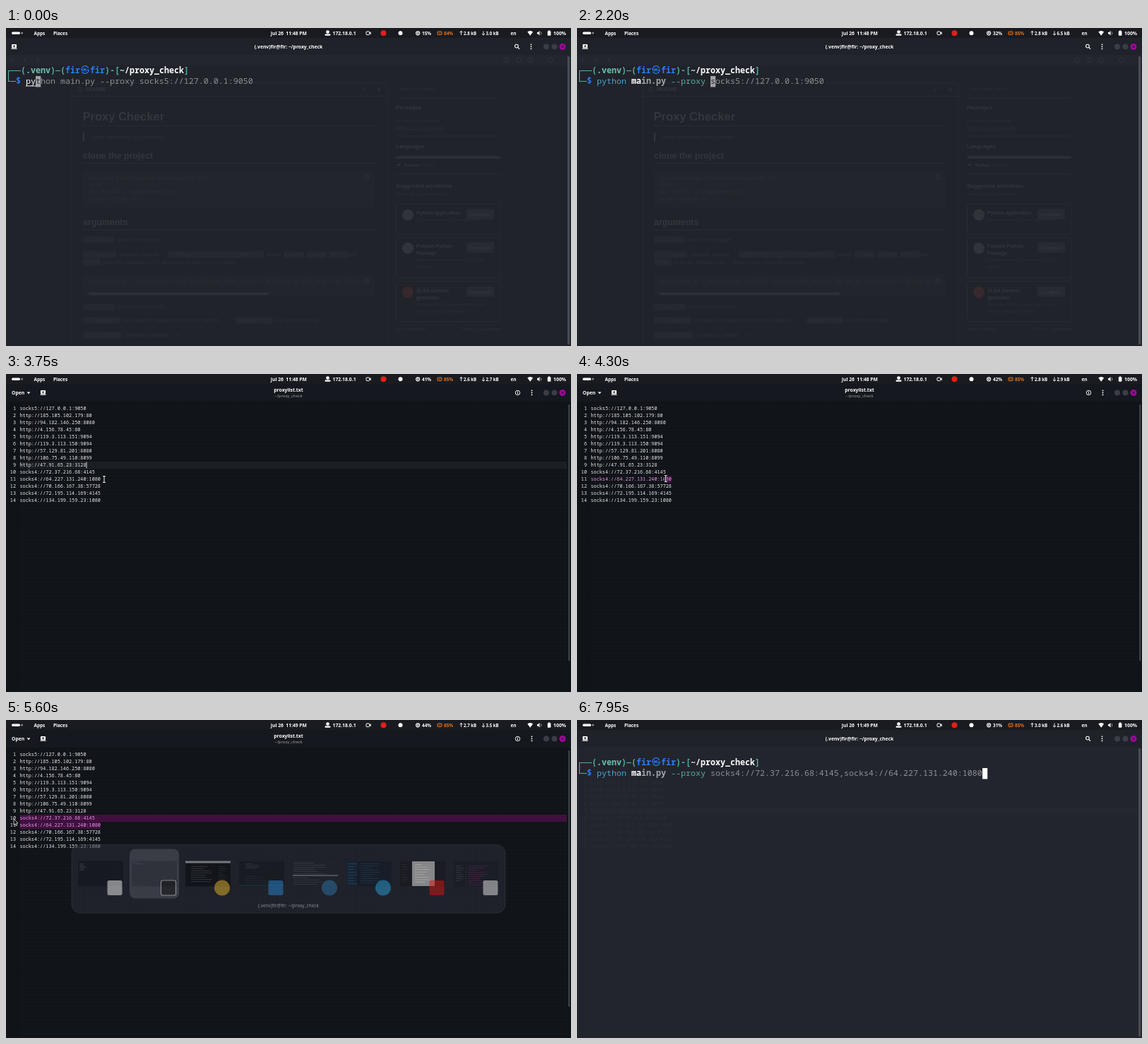
An HTML page with a canvas for the animation above (8 s loop, 800 by 450 pixels).

```html
<!DOCTYPE html>
<html lang="en">
<head>
<meta charset="utf-8">
<title>Proxy check</title>
<style>
html, body { margin: 0; width: 100%; height: 100%; overflow: hidden; background: #22252d; }
canvas { display: block; width: 800px; height: 450px; }
</style>
</head>
<body>
<canvas id="stage" width="800" height="450"></canvas>
<script>
const canvas = document.getElementById('stage');
const c = canvas.getContext('2d');
const LOOP = 8000, STEP = 50;
const SANS = '"Noto Sans", sans-serif';
const MONO = '"Noto Sans Mono", monospace';
const ARIAL = '"Liberation Sans", Arial, sans-serif';
const USER = 'fir';
const HOST_TITLE = `(.venv)${USER}@${USER}: ~/proxy_check`;
const TERM = '#22252d', GREY = '#8e9095', TEAL = '#53b09c', BLUE = '#277fff', WHITE = '#fff';

const clamp = v => Math.max(0, Math.min(1, v));
const ramp = (t, a, b) => clamp((t - a) / (b - a));
const ease = v => v * v * (3 - 2 * v);

function rect(x, y, w, h, color, r = 0) {
  c.fillStyle = color;
  c.beginPath();
  c.roundRect(x, y, w, h, r);
  c.fill();
}
function frame(x, y, w, h, color, r = 0, lw = 1) {
  c.strokeStyle = color;
  c.lineWidth = lw;
  c.beginPath();
  c.roundRect(x, y, w, h, r);
  c.stroke();
}
function dot(x, y, r, color) {
  c.fillStyle = color;
  c.beginPath();
  c.arc(x, y, r, 0, 7);
  c.fill();
}
function line(color, lw, ...p) {
  c.strokeStyle = color;
  c.lineWidth = lw;
  c.beginPath();
  c.moveTo(p[0], p[1]);
  for (let i = 2; i < p.length; i += 2) c.lineTo(p[i], p[i + 1]);
  c.stroke();
}
function poly(color, ...p) {
  c.fillStyle = color;
  c.beginPath();
  for (let i = 0; i < p.length; i += 2) c.lineTo(p[i], p[i + 1]);
  c.fill();
}
function text(s, x, y, color, font, align = 'left') {
  c.font = font;
  c.fillStyle = color;
  c.textAlign = align;
  c.fillText(s, x, y);
}
function fade(a, draw) {
  if (a <= 0) return;
  c.save();
  c.globalAlpha = a;
  draw();
  c.restore();
}

// ---- top bar ----
// time, cpu %, memory %, upload, download
const stats = [
  [0, 15, 84, '2.8', '3.0'], [550, 22, 84, '2.6', '2.9'], [950, 27, 84, '2.7', '2.8'],
  [1550, 30, 85, '2.9', '4.1'], [2000, 32, 85, '2.8', '6.5'], [2500, 34, 85, '2.6', '4.2'],
  [2950, 37, 85, '2.4', '2.6'], [3500, 41, 85, '2.6', '2.7'], [4000, 42, 85, '2.8', '2.9'],
  [4450, 40, 85, '2.5', '3.1'], [5000, 42, 85, '2.6', '3.2'], [5450, 44, 85, '2.7', '3.5'],
  [5950, 41, 85, '3.4', '2.8'], [6450, 36, 85, '4.8', '2.0'], [6950, 33, 85, '3.9', '2.3'],
  [7450, 32, 85, '3.4', '2.5'], [7950, 31, 85, '3.0', '2.6']
];

function arrow(x, dir) {
  line(WHITE, 0.9, x, 4.5, x, 10);
  const tip = dir < 0 ? 4.2 : 10.2;
  line(WHITE, 0.9, x - 2, tip - dir * 2.2, x, tip, x + 2, tip - dir * 2.2);
}

function topBar(t) {
  rect(0, 0, 800, 14, '#191b21');
  const bold = '600 6.4px ' + SANS;
  rect(8, 5.5, 12, 3.4, WHITE, 1.7);
  dot(22.6, 7.2, 1.4, '#8b8d92');
  text('Apps', 39.5, 9.6, WHITE, bold);
  text('Places', 67, 9.6, WHITE, bold);
  text('Jul 26  11:' + (t < 5000 ? 48 : 49) + ' PM', 400.3, 9.6, WHITE, '600 6.7px ' + SANS, 'center');
  dot(455.5, 5.6, 2.4, WHITE);
  rect(451.5, 8.6, 8, 2.2, WHITE, 1);
  text('172.18.0.1', 462.5, 9.6, WHITE, '600 6.8px ' + SANS);
  frame(510, 5, 4.6, 4.6, WHITE, 1);
  poly(WHITE, 514.5, 7.2, 516.6, 5, 516.6, 9.6);
  dot(534.5, 7.3, 4, '#e0201b');
  dot(558.5, 7.2, 3, WHITE);

  const [, cpu, mem, up, down] = stats.filter(s => s[0] <= t).pop();
  frame(580.6, 4.8, 5, 5, WHITE, 2.5, 1.2);
  dot(583.1, 7.3, 1.1, WHITE);
  text(cpu + '%', 589, 9.6, WHITE, bold);
  frame(611, 5, 6, 4.5, '#e8731a', 1.2, 1.1);
  line('#e8731a', 0.9, 612.5, 7.2, 615.5, 7.2);
  text(mem + '%', 620, 9.6, '#e8731a', bold);
  arrow(644.5, -1);
  text(up + ' kB', 648, 9.6, WHITE, '600 6.1px ' + SANS);
  arrow(676, 1);
  text(down + ' kB', 679.5, 9.6, WHITE, '600 6.1px ' + SANS);
  text('en', 714.5, 9.6, WHITE, bold);
  poly(WHITE, 738.3, 5.5, 740, 4.5, 742.2, 4, 744.4, 4.5, 746.1, 5.5, 742.2, 10.8);
  poly(WHITE, 752, 6, 753.4, 6, 755.5, 4, 755.5, 10.6, 753.4, 8.6, 752, 8.6);
  line('#b9bbc0', 0.8, 757, 5.2, 758, 7.3, 757, 9.4);
  rect(766.8, 4.2, 4.6, 6.6, WHITE, 0.8);
  rect(768.1, 3.4, 2, 1, WHITE);
  text('100%', 775, 9.6, WHITE, '600 6.9px ' + SANS);
}

function buttons(active) {
  const idle = active ? '#3b3d45' : '#000';
  dot(765, 26.5, 4, idle);
  dot(776.5, 26.5, 4, idle);
  dot(788, 26.5, 4.5, active ? '#a0089c' : '#000');
  if (active) {
    line('#200020', 0.9, 786.4, 24.9, 789.6, 28.1);
    line('#200020', 0.9, 789.6, 24.9, 786.4, 28.1);
  }
}
function menuDots(x, color) {
  for (const y of [23.4, 26.4, 29.4]) dot(x, y, 0.95, color);
}
function tabIcon(x, color) {
  rect(x - 3.5, 23, 7, 5.5, color, 0.8);
  rect(x - 4, 28.8, 8, 1, color);
  line('#15171d', 0.9, x, 24.2, x, 27.4);
  line('#15171d', 0.9, x - 1.6, 25.8, x + 1.6, 25.8);
}

// ---- web page behind the terminal ----
function ghostPage() {
  const ink = '#33363c', soft = '#2c2f36', edge = '#282b32', code = '#22262c';
  const p = (s, x, y, size = 7, color = soft) => text(s, x, y, color, size + 'px ' + ARIAL);
  const b = (s, x, y, size, color = ink) => text(s, x, y, color, `bold ${size}px ${ARIAL}`);
  const m = (s, x, y) => text(s, x, y, soft, '6.6px ' + MONO);
  const chip = (x, y, w) => rect(x, y - 7, w, 9.5, '#25282f', 2);
  rect(0, 38, 800, 412, '#20232a');
  rect(0, 38, 800, 15, '#23262e');
  for (const x of [8, 27, 45]) dot(x, 46, 2, soft);
  for (const x of [708, 726, 742, 771]) frame(x - 3, 43, 6, 6, ink, 2, 0.8);
  frame(93, 78, 447, 390, edge, 4);
  line(edge, 1, 93, 96.5, 540, 96.5);
  frame(102, 84, 5, 6, ink, 1, 0.8);
  b('README', 113, 89.4, 6.6);
  line(ink, 1, 505, 89.5, 510, 84.5);
  for (const y of [85, 87, 89]) line(ink, 0.7, 526, y, 531, y);
  b('Proxy Checker', 108.5, 131, 16.5);
  line(edge, 1, 109, 138.5, 522, 138.5);
  rect(109, 148, 2, 12, ink);
  p('simple tool for test proxy servers.', 119, 157, 7.2);
  b('clone the project', 109, 185, 12.4);
  line(edge, 1, 109, 191.5, 522, 191.5);
  rect(109, 202, 413, 52, code, 3);
  ['git clone https://github.com/pxuser/PC.git', 'cd PC',
    'pip install -r requirements.txt', 'python main.py -h'].forEach((s, i) => m(s, 117, 215 + 9.7 * i));
  frame(509, 208, 5, 5, ink, 1, 0.8);
  b('arguments', 109, 279, 12.4);
  line(edge, 1, 109, 285.5, 522, 285.5);

  const arg = (s, note, y, w) => {
    chip(109, y, w);
    m(s, 112, y);
    p(note, 113 + w, y);
  };
  arg('-h --help', 'show the help page.', 302, 44);
  arg('-p --proxy', 'set proxy. execute', 323, 47);
  chip(229, 323, 136);
  m('[protocol]://[ip or id]:[port].', 232, 323);
  p('accept', 369, 323);
  ['socks4', 'socks5', 'http'].forEach((s, i) => {
    chip(393 + i * 32, 323, 29);
    m(s, 395 + i * 32, 323);
  });
  p('and', 485, 323);
  chip(109, 333.5, 25);
  m('https', 111, 333.5);
  p("protocols. separated by ',', allows you to check list of proxies.", 137, 333.5);
  rect(109, 349, 413, 30, code, 3);
  m('python main.py --proxy socks4://192.111.129.145:16894,socks5://98.162.25.16:4145,http://20.111.54.16', 117, 361);
  frame(509, 355, 5, 5, ink, 1, 0.8);
  rect(117, 374, 255, 4, '#2c2f36', 2);
  arg('-f --file', 'set proxy list file path.', 397, 45);
  arg('-o --output', 'set output file having online proxies (default:', 416, 53);
  chip(325, 416, 52);
  m('[output.txt])', 327, 416);
  p('and sorted by delay.', 381, 416);
  arg('-t --timeout', 'set timeout (default:', 437, 55);
  m('5).', 239, 437);

  p('Create a new release', 552, 88, 6);
  line(edge, 1, 552, 99, 700, 99);
  b('Packages', 552, 115, 7.8);
  p('No packages published', 552, 133, 6);
  p('Publish your first package', 552, 142.5, 6);
  line(soft, 0.6, 552, 144, 620, 144);
  line(edge, 1, 552, 153, 700, 153);
  b('Languages', 552, 170, 7.8);
  rect(552, 181, 148, 4, '#2b2e36', 2);
  dot(556, 193.5, 1.6, ink);
  b('Python', 564, 196, 6.2);
  p('100.0%', 587, 196, 6.2);
  line(edge, 1, 552, 207, 700, 207);
  b('Suggested workflows', 552, 226, 7.8);
  p('Based on your tech stack', 552, 237, 6.2);
  const card = (y, h, names, notes, color) => {
    frame(552.5, y, 147.5, h, edge, 3);
    dot(569, y + 15.5, 8, color);
    names.forEach((s, i) => b(s, 581, y + 15 + 10 * i, 7));
    notes.forEach((s, i) => p(s, 581, y + 14 + 10 * (names.length + i), 5.8));
    rect(652, y + 7, 39, 15, '#272a31', 3);
    b('Configure', 657, y + 17, 6);
  };
  card(249, 43, ['Python application'], ['Create and test a Python application.'], '#303339');
  card(296, 58, ['Publish Python', 'Package'], ['Publish a Python Package to PyPI on', 'release.'], '#303339');
  card(358.5, 57, ['SLSA Generic', 'generator'], ['Generate SLSA3 provenance for your', 'existing release workflows'], '#37282d');
  p('More workflows', 552, 428, 6.2);
  p('Dismiss suggestions', 645, 428, 6.2);
}

// ---- text editor ----
const list = [
  'socks5://127.0.0.1:9050', 'http://185.105.102.179:80', 'http://94.182.146.250:8080',
  'http://4.156.78.45:80', 'http://119.3.113.151:9094', 'http://119.3.113.150:9094',
  'http://57.129.81.201:8080', 'http://106.75.49.110:8099', 'http://47.91.65.23:3128',
  'socks4://72.37.216.68:4145', 'socks4://64.227.131.240:1080', 'socks4://70.166.167.38:57728',
  'socks4://72.195.114.169:4145', 'socks4://134.199.159.23:1080'
];
const SMALL = '500 6.82px ' + MONO;
const rowY = n => 49 + 10 * (n - 1);

function listing(color, picked = [], from = 1) {
  list.forEach((s, i) => {
    if (i + 1 < from) return;
    const y = rowY(i + 1) + 2.4;
    text(i + 1, 14, y, color, SMALL, 'right');
    text(s, 19.5, y, picked.includes(i + 1) ? '#e99be6' : color, SMALL);
  });
}

function mouseAt(t) {
  if (t < 4300) {
    const k = ease(ramp(t, 3300, 3750));
    return [284 - 145 * k, 222 - 73 * k];
  }
  const k = ease(ramp(t, 4250, 4500));
  return [139 - 128 * k, 149 - 9 * k];
}

function editor(t) {
  rect(0, 14, 800, 436, '#101318');
  c.fillStyle = 'rgba(255,255,255,0.012)';
  for (let x = 20; x < 795; x += 5) c.fillRect(x, 40, 1, 410);
  for (let y = 44; y < 450; y += 5) c.fillRect(20, y, 775, 1);
  rect(0, 14, 800, 25, '#15181e');
  text('Open', 8, 28.8, WHITE, '600 6.8px ' + SANS);
  poly(WHITE, 29.5, 25.5, 34.5, 25.5, 32, 28.2);
  tabIcon(52.5, WHITE);
  text('proxylist.txt', 400, 25, WHITE, '600 6.8px ' + SANS, 'center');
  text('~/proxy_check', 400, 33, '#9b9da1', '5.9px ' + SANS, 'center');
  frame(721.3, 23.3, 6.4, 6.4, WHITE, 3.2, 1);
  line(WHITE, 1, 724.5, 26, 724.5, 28.4);
  dot(724.5, 24.9, 0.6, WHITE);
  menuDots(744.5, WHITE);
  buttons(true);

  const [mx, my] = mouseAt(t);
  const dragging = t >= 4300;
  const picked = [];
  if (dragging) {
    const upper = my < 144;
    const start = Math.max(19.5, Math.min(134, mx));
    if (upper) {
      picked.push(10, 11);
      rect(start, 134, 794 - start, 10, '#40103f');
      rect(19.5, 144, 114.6, 10, '#40103f');
    } else {
      picked.push(11);
      rect(start, 144, 134 - start, 10, '#40103f');
    }
  } else {
    const row = t < 3850 ? 9 : 11;
    rect(19.5, rowY(row) - 5, 774.5, 10, '#1b1e23');
    rect(19.5 + list[row - 1].length * 4.092, rowY(row) - 4.5, 0.8, 9, WHITE);
  }
  listing('#e9eaec', picked);
  rect(796.4, 43, 1.8, 363, '#4a4d52', 1);
}

// ---- terminal ----
const FONT = '11.667px ' + MONO, MEDIUM = '500 ' + FONT, BOLD = '700 ' + FONT;
const CELL = 7;
const SUGGEST = 'socks5://127.0.0.1:9050';
const FIRST = 'socks4://72.37.216.68:4145', SECOND = 'socks4://64.227.131.240:1080';
const FULL = 'python main.py --proxy ' + SUGGEST;
const put = (s, x, row, color, font = MEDIUM) => text(s, x, 64.2 + 15 * row, color, font);

function prompt() {
  line(TEAL, 1.1, 21, 60.5, 3.5, 60.5, 3.5, 75.5, 14, 75.5);
  put('(', 21, 0, TEAL, BOLD);
  put('.venv', 28, 0, '#6cc2b0', BOLD);
  put(')', 63, 0, TEAL, BOLD);
  line(TEAL, 1.1, 70, 60.5, 77, 60.5);
  put('(', 77, 0, TEAL, BOLD);
  put(USER, 84, 0, BLUE, BOLD);
  text('㉿', 112, 64.4, BLUE, 'bold 12px "Noto Sans CJK KR", "Noto Sans CJK JP", sans-serif', 'center');
  put(USER, 119, 0, BLUE, BOLD);
  put(')', 140, 0, TEAL, BOLD);
  put('-', 147, 0, TEAL, BOLD);
  put('[', 154, 0, TEAL, BOLD);
  put('~/proxy_check', 161, 0, WHITE, BOLD);
  put(']', 252, 0, TEAL, BOLD);
  put('$', 14, 1, BLUE, BOLD);
}

function block(x, row, under, hollow) {
  const y = 53 + 15 * row;
  if (hollow) {
    frame(x + 0.5, y + 0.5, 7, 15, '#8e9095', 0, 0.9);
    return;
  }
  rect(x, y, 7.2, 15.5, under ? '#a2a4a8' : WHITE);
  if (under) put(under, x, row, TERM);
}

// time, characters left of the cursor
const moves = [[0, 2], [50, 3], [350, 4], [450, 5], [500, 6], [600, 7], [750, 8], [950, 9],
  [1450, 46], [1900, 41], [2050, 32], [2200, 23]];

function command(t, focused) {
  const n = moves.filter(m => m[0] <= t).pop()[1];
  const x = 28 + n * CELL;
  if (t < 1450) {
    if (n < 6) {
      put('python'.slice(0, n), 28, 1, WHITE);
      line(WHITE, 0.9, 28, 82, x, 82);
    } else put('python', 28, 1, '#49a5d0');
    if (n > 7) {
      put('main.py'.slice(0, n - 7), 77, 1, WHITE, BOLD);
      line(WHITE, 0.9, 77, 82, x, 82);
    }
    const hidden = t >= 1100 && t < 1250;
    if (!hidden) put(FULL.slice(n), x, 1, GREY);
    block(x, 1, hidden ? '' : FULL[n], false);
    return;
  }
  put('python', 28, 1, '#49a5d0');
  put('ma', 77, 1, WHITE, BOLD);
  put('in.py', 91, 1, '#a4a6aa', BOLD);
  put('--proxy', 133, 1, '#56ad99');
  if (t < 6300) {
    put(SUGGEST, 189, 1, GREY);
    block(x, 1, FULL[n], !focused);
    return;
  }
  put(FIRST, 189, 1, GREY);
  if (t < 6950) {
    put(SECOND, 0, 2, GREY);
    line(GREY, 0.9, 0, 97, 196, 97);
    if (t < 6750) block(196, 2, '');
    else if (t < 6800) block(168, 2, SECOND[24]);
    else block(0, 2, 's');
  } else if (t < 7400) {
    put(SECOND, 371, 1, GREY);
    block(371, 1, t < 7150 ? '' : 's');
  } else {
    put(',' + SECOND, 371, 1, GREY);
    if (t < 7700) block(378, 1, 's');
    else block(574, 1, '');
  }
}

function terminal(t, focused) {
  rect(0, 14, 800, 436, TERM);
  if (t < 4500) ghostPage();
  else {
    rect(19, 124, 775, 10, '#24272f');
    listing('#2d3037', [], t >= 6300 && t < 6950 ? 6 : 5);
  }
  rect(0, 14, 800, 24, focused ? '#1f2229' : '#23262d');
  const ink = focused ? WHITE : '#8f9196';
  tabIcon(11.5, ink);
  text(HOST_TITLE, 400, 28.6, ink, '600 6.8px ' + SANS, 'center');
  frame(720.5, 23.2, 4.8, 4.8, ink, 2.4, 1.1);
  line(ink, 1.2, 724.7, 27.4, 727, 29.8);
  menuDots(743.5, ink);
  buttons(focused);
  prompt();
  command(t, focused);
  rect(795, 40, 3.2, 408, '#4a4c53', 1.6);
}

// ---- window switcher ----
function lines(x, y, w, n, gap, color) {
  for (let i = 0; i < n; i++) rect(x, y + i * gap, w * (0.45 + 0.5 * Math.abs(Math.sin(i * 2.3 + w))), 0.8, color);
}
// label, window colour, icon colour, round icon, contents
const apps = {
  term: [HOST_TITLE, '#262932', '#101216', 0, x => lines(x + 1, 201, 22, 2, 2, '#41566b')],
  web: ['Proxy Checker: proxy tool - Web Browser', '#07090d', '#e5b72c', 1, x => {
    rect(x, 199.5, 64, 3, '#d9dce0');
    lines(x + 8, 207, 32, 8, 3, '#5a5f67');
    lines(x + 47, 207, 12, 7, 3, '#3f434b');
  }],
  code: ['main.py - proxy_check - Code Editor', '#12161b', '#2784cf', 0, x => {
    lines(x + 9, 203, 22, 4, 2, '#454e57');
    lines(x + 9, 221, 38, 5, 3, '#2c353d');
    rect(x, 233.5, 64, 1, '#1d5962');
  }],
  edit: ['proxylist.txt (~/proxy_check) - Text Editor', '#0f1216', '#f4f4f4', 0, x => lines(x + 2, 203, 10, 6, 1.8, '#5c6064')],
  vim: ['notes.txt - Vim', '#20252b', '#2b73a8', 1, x => {
    lines(x + 1, 202, 50, 6, 3, '#525a63');
    rect(x, 219, 64, 2, '#7c848c');
    lines(x + 1, 223, 44, 4, 3, '#454d56');
  }],
  chat: ['Messages - Chat', '#111b27', '#2ba0da', 1, x => {
    rect(x, 200, 15, 35, '#182c3d');
    lines(x + 2, 203, 14, 8, 4, '#316488');
    lines(x + 20, 203, 30, 10, 3, '#264f6f');
  }],
  doc: ['report.pdf - Document Viewer', '#16171a', '#d81410', 0, x => {
    rect(x + 17, 200, 32, 35, '#f1f1ee');
    lines(x + 21, 204, 22, 8, 3.6, '#cfcfca');
    lines(x + 3, 204, 9, 8, 3.6, '#3a3c40');
  }],
  music: ['Music - Player', '#191a20', '#e6e8ea', 0, x => {
    rect(x + 17, 207, 1, 27, '#30323a');
    lines(x + 20, 206, 30, 10, 3, '#6c2a6e');
    lines(x + 3, 206, 12, 8, 3, '#55585f');
  }]
};

function switcher(order, sel) {
  rect(93, 176.5, 614, 96.5, '#2f313c', 12);
  frame(93, 176.5, 614, 96.5, '#444752', 12, 0.8);
  order.forEach((key, i) => {
    const [label, bg, color, round, detail] = apps[key];
    const mid = 134 + 76 * i, x = mid - 32;
    if (i === sel) {
      rect(mid - 35, 182.5, 70, 70, '#555861', 8);
      text(label, 400, 265.4, '#f2f2f4', '6.5px ' + SANS, 'center');
    }
    rect(x, 199.5, 64, 36, bg);
    detail(x);
    if (round) dot(mid + 20, 237.5, 11, color);
    else rect(mid + 9.5, 227, 21, 21, color, 2.5);
    if (key === 'term') frame(mid + 9.5, 227, 21, 21, '#e6e6e6', 2.5, 1.2);
  });
}

function pointer(x, y, beam) {
  if (beam) {
    for (const [lw, col] of [[2.2, '#000'], [1, WHITE]]) {
      line(col, lw, x, y - 4, x, y + 4);
      line(col, lw, x - 2, y - 4.3, x + 2, y - 4.3);
      line(col, lw, x - 2, y + 4.3, x + 2, y + 4.3);
    }
    return;
  }
  const p = [0, 0, 0, 8.5, 2, 6.8, 3.4, 9.6, 4.8, 9, 3.5, 6.2, 6, 6].map((v, i) => v + (i % 2 ? y : x));
  poly('#0c0d10', ...p);
  line('#e8e8e8', 0.8, ...p, p[0], p[1]);
}

const ORDER_A = ['term', 'web', 'code', 'edit', 'vim', 'chat', 'doc', 'music'];
const ORDER_B = ['edit', 'term', 'web', 'code', 'vim', 'chat', 'doc', 'music'];

function draw(t) {
  c.clearRect(0, 0, 800, 450);
  const toEditor = ramp(t, 3150, 3400), toTerm = ramp(t, 5750, 6000);
  if (t < 3400) terminal(t, t < 2450);
  else if (t >= 5750) terminal(t, true);
  if (toTerm < 1) fade(toEditor * (1 - toTerm), () => editor(t));
  topBar(t);

  const popA = ramp(t, 2400, 2550) * (1 - ramp(t, 3150, 3300));
  fade(popA, () => switcher(ORDER_A, t < 2950 ? 1 : t < 3050 ? 2 : 3));
  const popB = ramp(t, 5550, 5650) * (1 - ramp(t, 5800, 5950));
  fade(popB, () => switcher(ORDER_B, 1));

  if (t >= 2450 && t < 6000) {
    const [x, y] = mouseAt(t);
    pointer(x, y, t >= 3400 && x > 19);
  }
}

const begin = performance.now();
function tick() {
  const t = (performance.now() - begin) % LOOP;
  draw(Math.floor(t / STEP) * STEP);
  requestAnimationFrame(tick);
}
tick();
</script>
</body>
</html>
```
